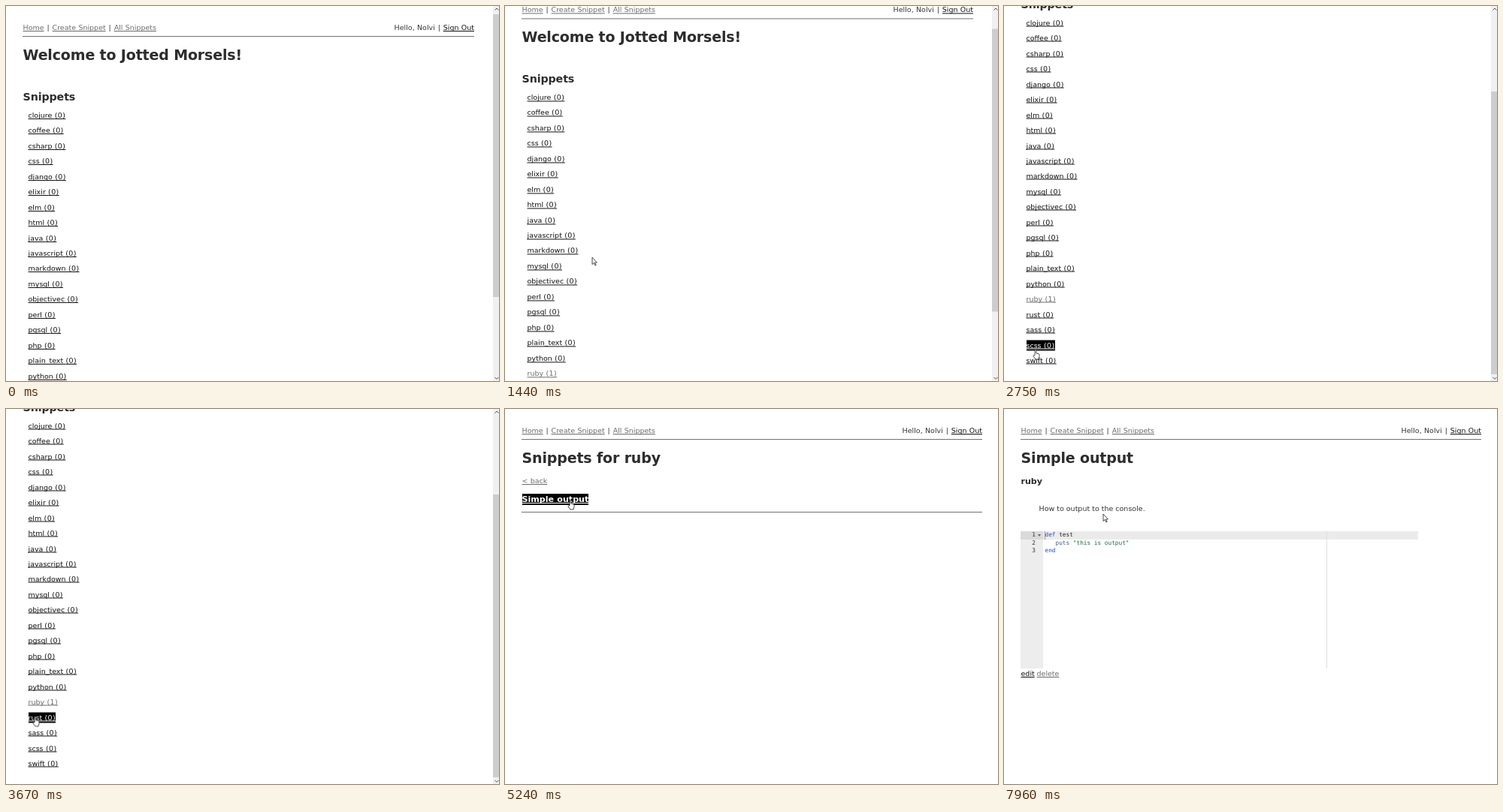
Recreate the animation shown at these times as an HTML page. Size 656x500 px, loop 8000 ms.

```html
<!DOCTYPE html>
<html lang="en">
<head>
<meta charset="utf-8">
<title>Snippets</title>
<style>
html, body { margin: 0; width: 100%; height: 100%; overflow: hidden; background: #fff; }
#stage {
  position: relative; width: 656px; height: 500px; overflow: hidden; background: #fff;
  font: 9.5px/14px "DejaVu Sans", sans-serif; color: #333; white-space: nowrap;
}
#stage * { animation-duration: 8s; animation-iteration-count: infinite; animation-timing-function: step-end; }
.page, .page > *, #list > *, #ed > * { position: absolute; }
.page { inset: 0; }
h1, h2, h3 { margin: 0; left: 22.5px; font-weight: bold; letter-spacing: -.008em; color: #2d2d2d; }
h1 { top: 53px; font-size: 19px; line-height: 24px; }
h2 { top: 111.5px; font-size: 14.25px; line-height: 18px; }
h3 { font-size: 11.1px; line-height: 14px; letter-spacing: 0; }
a {
  --c: #111; color: var(--c); word-spacing: .03em;
  text-decoration: underline 1px; text-decoration-skip-ink: none; text-underline-offset: 1px;
}
a.seen { --c: #6c6c6c; }
h3 a { padding: 1px 0; }
.nav, .user { top: 22px; word-spacing: .09em; }
.nav { left: 22.5px; }
.user { right: 21px; }
.user span { word-spacing: .03em; }
hr { margin: 0; border: 0; left: 22px; right: 21px; top: 40px; height: 1px; background: #707070; }

/* pages */
#home .user, #home hr { right: 33px; }
#home { animation-name: home; }
#lang { animation-name: lang; }
#snip { animation-name: snip; }
@keyframes home { 0% { visibility: visible; } 51.75%, 100% { visibility: hidden; } }
@keyframes lang { 0%, 73.5%, 100% { visibility: hidden; } 51.75% { visibility: visible; } }
@keyframes snip { 0% { visibility: hidden; } 73.5%, 100% { visibility: visible; } }

/* scrolling */
#stage #doc { inset: 0; animation-name: scroll; animation-timing-function: linear; }
@keyframes scroll {
  0%, 16% { transform: none; }
  18% { transform: translateY(-23.3px); }
  20% { transform: translateY(-66px); }
  22% { transform: translateY(-111px); }
  23% { transform: translateY(-121.8px); }
  24%, 100% { transform: translateY(-123.5px); }
}
#doc > * { position: absolute; }
#bar { right: 0; top: 0; width: 8px; height: 500px; background: #f0f0f0; }
#stage #thumb {
  position: absolute; top: 11px; width: 8px; height: 377px; background: #cdcdcd;
  animation-name: thumb; animation-timing-function: linear;
}
@keyframes thumb {
  0%, 16% { transform: none; }
  18% { transform: translateY(19.3px); }
  20% { transform: translateY(54.8px); }
  22% { transform: translateY(92px); }
  23% { transform: translateY(101px); }
  24%, 100% { transform: translateY(102.5px); }
}
#bar svg { position: absolute; left: 0; top: 0; fill: none; stroke: #505050; }

/* list and hover */
#list { left: 29.5px; top: 138.8px; }
#list a { padding: 1px 0; margin-top: -1px; line-height: 12px; }
#list i { font-style: normal; letter-spacing: .04em; }
#scss { animation-name: scss; }
#sass { animation-name: sass; }
#rust { animation-name: rust; }
#ruby { animation-name: ruby; }
#item { animation-name: item; }
@keyframes scss { 32.4% { background: #000; color: #fff; } 37.5%, 100% { background: none; color: var(--c); } }
@keyframes sass { 39% { background: #000; color: #fff; } 43%, 100% { background: none; color: var(--c); } }
@keyframes rust { 43.8% { background: #000; color: #fff; } 47%, 100% { background: none; color: var(--c); } }
@keyframes ruby { 47.1% { background: #000; color: #fff; } 51.75%, 100% { background: none; color: var(--c); } }
@keyframes item { 64.5% { background: #000; color: #fff; } 73.5%, 100% { background: none; color: var(--c); } }

/* editor */
#ed {
  left: 22px; top: 163px; width: 529px; height: 183px; white-space: pre;
  font: 7.75px/10.5px "DejaVu Sans Mono", monospace; color: #222;
}
#ed > * { left: 0; top: 0; }
#ed .gutter { width: 30px; height: 183px; background: #ededed; }
#ed .line { left: 30px; width: 499px; height: 10.5px; background: #ebebeb; }
#ed .cell { width: 30px; height: 10.5px; background: #dadada; }
#ed .margin { left: 407px; width: 1px; height: 183px; background: #dfdfdf; }
#ed .caret { left: 32px; width: 1px; height: 10.5px; background: #999; }
#ed .nums { width: 20px; text-align: right; color: #333; }
#ed .fold { left: 23px; top: 4px; border: 2px solid transparent; border-top: 3px solid #666; border-bottom: 0; }
#ed .code { left: 32.5px; }
b { font-weight: normal; color: #1a4fcc; }
.fn { color: #3c5a96; }
.str { color: #0d7434; }

/* status bubbles */
.tip {
  position: absolute; left: 0; bottom: 0; height: 12px; box-sizing: border-box; padding-left: 2px; opacity: 0;
  border: solid #c4c4c4; border-width: 1px 1px 0 0; background: #f2f2f2; color: #666;
  font: 9px/11px "Open Sans", sans-serif; overflow: hidden;
}
#stage .tip { animation-timing-function: linear; }
#tip1 { width: 233px; animation-name: tip1; }
#tip2 { width: 213px; animation-name: tip2; }
@keyframes tip1 { 0%, 48.5% { opacity: 0; } 49.5%, 53% { opacity: 1; } 55.6%, 100% { opacity: 0; } }
@keyframes tip2 { 0%, 67% { opacity: 0; } 69.5%, 73.5% { opacity: 1; } 75%, 100% { opacity: 0; } }

/* pointer */
#stage #ptr {
  position: absolute; left: 0; top: 0; overflow: visible; fill: #fff; stroke: #111; stroke-width: .75;
  animation-name: move; animation-timing-function: linear;
}
@keyframes move {
  0%, 2.6% { transform: translate(577px, 437px); }
  4.5% { transform: translate(480px, 330px); }
  6.2% { transform: translate(370px, 248px); }
  7.5% { transform: translate(290px, 224px); }
  9.5% { transform: translate(200px, 262px); }
  11% { transform: translate(145px, 315px); }
  12.4% { transform: translate(121px, 336px); }
  14%, 18% { transform: translate(116px, 335px); }
  23%, 24% { transform: translate(115px, 343px); }
  33.4%, 34.4% { transform: translate(42px, 458px); }
  41.25% { transform: translate(42px, 430px); }
  43% { transform: translate(41px, 425px); }
  45.9% { transform: translate(39px, 410px); }
  47% { transform: translate(39px, 403px); }
  48%, 57.6% { transform: translate(40px, 392px); }
  60% { transform: translate(53px, 310px); }
  63% { transform: translate(77px, 165px); }
  65.5%, 73.5% { transform: translate(87px, 121px); }
  79% { transform: translate(108px, 245px); }
  82.2%, 83.1% { transform: translate(116.5px, 273px); }
  86% { transform: translate(72px, 205px); }
  88%, 90% { transform: translate(44px, 165px); }
  95.7%, 97.5% { transform: translate(159px, 177px); }
  99.5%, 100% { transform: translate(132px, 140px); }
}
#arrow { animation-name: arrow; }
#hand { animation-name: hand; }
#beam { animation-name: beam; }
@keyframes arrow {
  0%, 30.7%, 64.5%, 75.5%, 91%, 100% { visibility: hidden; }
  2.6%, 51.75%, 73.5%, 87.3%, 98.3%, 99.99% { visibility: visible; }
}
@keyframes hand {
  0%, 51.75%, 73.5%, 100% { visibility: hidden; }
  30.7%, 64.5% { visibility: visible; }
}
@keyframes beam {
  0%, 87.3%, 98.3%, 100% { visibility: hidden; }
  75.5%, 91% { visibility: visible; }
}
</style>
</head>
<body>
<div id="stage">
  <div class="page" id="home">
    <div id="doc">
      <h1>Welcome to Jotted Morsels!</h1>
      <h2>Snippets</h2>
      <div id="list"></div>
    </div>
    <div id="bar">
      <div id="thumb"></div>
      <svg width="8" height="500"><path d="M2.5 5.5L5 3L7.5 5.5M2.5 495L5 497.5L7.5 495"/></svg>
    </div>
  </div>
  <div class="page" id="lang">
    <h1>Snippets for ruby</h1>
    <a class="seen" style="left:22.5px;top:89px">&lt; back</a>
    <h3 style="top:113.5px"><a id="item">Simple output</a></h3>
    <hr style="top:137px">
  </div>
  <div class="page" id="snip">
    <h1>Simple output</h1>
    <h3 style="top:89.5px">ruby</h3>
    <div style="left:46.5px;top:126px">How to output to the console.</div>
    <div id="ed">
      <div class="gutter"></div><div class="line"></div><div class="cell"></div>
      <div class="margin"></div><div class="caret"></div>
      <div class="nums">1
2
3</div>
      <div class="fold"></div>
      <div class="code"><b>def</b> test
   <span class="fn">puts</span> <span class="str">"this is output"</span>
<b>end</b></div>
    </div>
    <a style="left:22.5px;top:346px">edit</a>
    <a class="seen" style="left:43.5px;top:346px">delete</a>
  </div>
  <div class="tip" id="tip1">https://localhost:8000/snippets/language/ruby</div>
  <div class="tip" id="tip2">https://localhost:8000/snippets/ruby/show/1</div>
  <svg id="ptr" width="1" height="1">
    <path id="arrow" d="M0 0V9.5L2.3 7.4L4 11L5.2 10.4L3.6 7H6.4Z"/>
    <path id="hand" d="M-.9 7.5V.9A.9 .9 0 0 1 .9 .9V5L4 5.6Q5 6 5 7V9.5L4 13H0L-3 8.8Q-3 7.6 -2 7.6Z"/>
    <path id="beam" fill="none" d="M-2 -5.5H2M-2 5.5H2M0 -5.5V5.5"/>
  </svg>
</div>
<script>
const header = `<div class="nav"><a class="seen">Home</a> | <a class="seen">Create Snippet</a> | <a class="seen">All Snippets</a></div>` +
  `<div class="user"><span>Hello, Nolvi</span> | <a>Sign Out</a></div><hr>`;
for (const id of ["doc", "lang", "snip"])
  document.getElementById(id).insertAdjacentHTML("afterbegin", header);

const langs = ("clojure coffee csharp css django elixir elm html java javascript markdown mysql " +
  "objectivec perl pgsql php plain_text python ruby rust sass scss swift").split(" ");
document.getElementById("list").innerHTML = langs.map((name, i) => {
  const seen = name === "ruby";
  return `<a id="${name}" class="${seen ? "seen" : ""}" style="top:${(i * 20.47 + 1).toFixed(2)}px">${name} <i>(${seen ? 1 : 0})</i></a>`;
}).join("");
</script>
</body>
</html>
```
